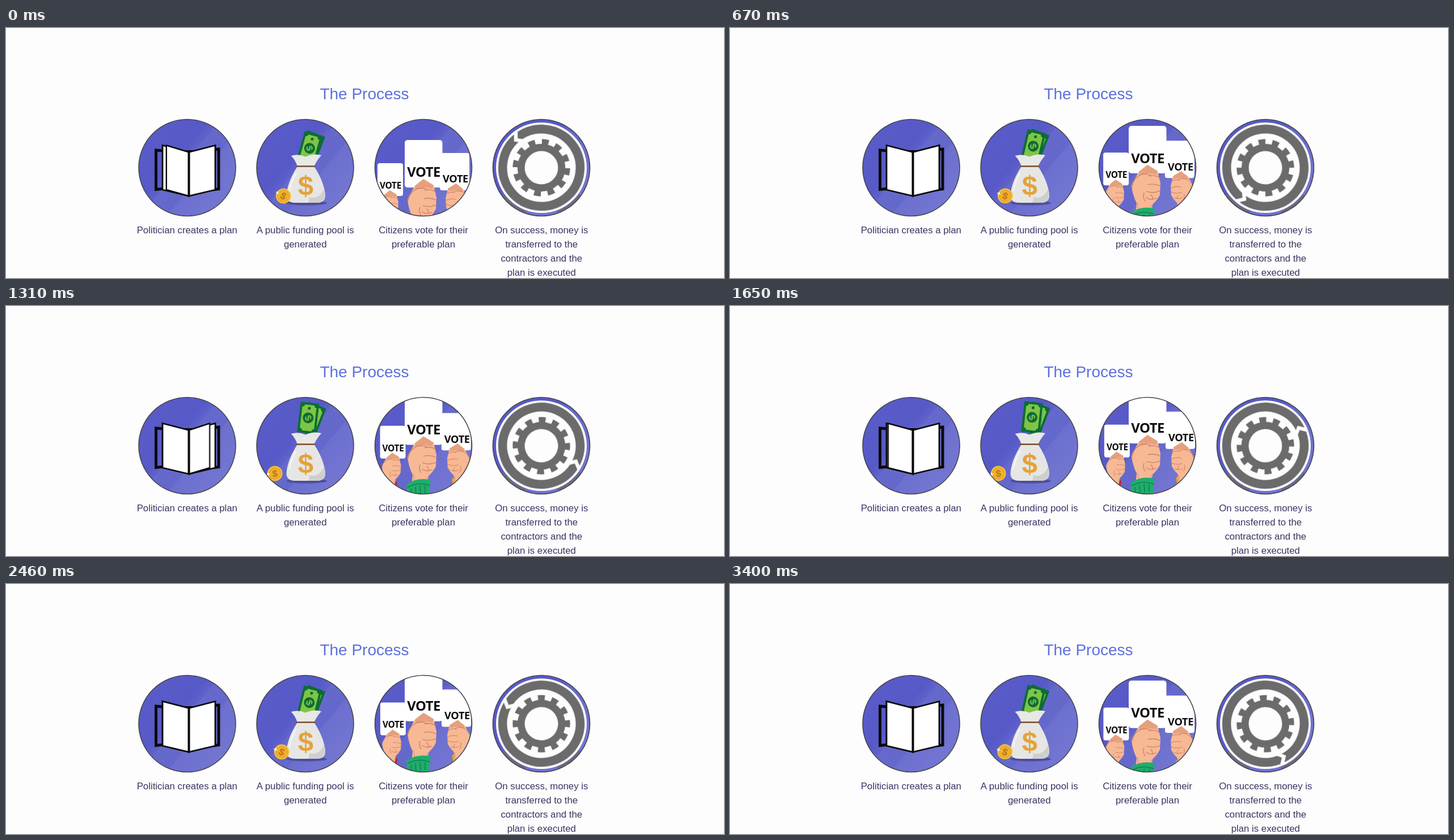
An HTML page for the animation above (3.42 s loop, 1266x442 px).

```html
<!DOCTYPE html>
<html lang="en">
<head>
<meta charset="utf-8">
<title>The Process</title>
<style>
  @property --drop { syntax: "<number>"; inherits: true; initial-value: 0; }
  @property --swing { syntax: "<number>"; inherits: true; initial-value: 0; }

  html, body { margin: 0; width: 100%; height: 100%; overflow: hidden; background: #fdfdfd; }

  #stage {
    display: block; width: 1266px; height: 442px;
    font-family: "Liberation Sans", Arial, sans-serif; text-anchor: middle;
    animation: drop 3420ms infinite, swing 3420ms infinite;
  }
  .title { font-size: 28px; fill: #5d70de; }
  .label { font-size: 16.8px; fill: #3b3361; }
  .rim { fill: none; stroke: #45454d; stroke-width: 1.6; }
  .vote { font-family: "Open Sans", "Noto Sans", sans-serif; font-weight: 700; letter-spacing: -.02em; fill: #0a0a0a; }
  .bold { font-weight: 700; }

  /* Signs and fists rise, settle, then start to sink */
  @keyframes drop {
    0% { --drop: 1; animation-timing-function: cubic-bezier(.33, .85, .67, 1); }
    60.82% { --drop: 0; animation-timing-function: cubic-bezier(.33, 0, .67, .15); }
    100% { --drop: .33; }
  }
  .sign-l { transform: translate(calc(var(--drop) * -5px), calc(var(--drop) * 30px)); }
  .sign-r { transform: translate(calc(var(--drop) * -3px), calc(var(--drop) * 35px)); }
  .sign-m { transform: translateY(calc(var(--drop) * 40px)); }

  /* Bills leave the bag while the coin rolls away */
  @keyframes swing {
    0% { --swing: .05; animation-timing-function: ease-out; }
    5.7% { --swing: 0; animation-timing-function: cubic-bezier(.37, 0, .63, 1); }
    45.18% { --swing: 1; animation-timing-function: cubic-bezier(.37, 0, .63, 1); }
    84.65% { --swing: 0; animation-timing-function: cubic-bezier(.33, 0, .67, .37); }
    100% { --swing: .33; }
  }
  .coin {
    transform: translate(calc(490px - var(--swing) * 17px), calc(297px - var(--swing) * 1px))
      rotate(calc(30deg - var(--swing) * 38deg));
  }
  .bill-back {
    transform: translate(calc(532px + var(--swing) * 2px), calc(181.5px - var(--swing) * 13px)) rotate(21deg);
  }
  .bill-front {
    transform: translate(calc(527px - var(--swing) * 8px), calc(183px - var(--swing) * 15px))
      rotate(calc(16deg - var(--swing) * 10deg));
  }

  .page { transform-origin: 322.5px 0; animation: flip 3420ms infinite cubic-bezier(.37, 0, .63, 1); }
  @keyframes flip {
    0% { transform: scaleX(-.85); animation-timing-function: ease-out; }
    2.63% { transform: scaleX(-1); animation-timing-function: step-end; }
    2.64%, 35.23% { transform: scaleX(1); }
    49.85% { transform: scaleX(-1); animation-timing-function: step-end; }
    49.86%, 54.53% { transform: scaleX(1); }
    69.15%, 100% { transform: scaleX(-1); }
  }

  .ring, .gear { transform-origin: 944px 247px; animation: 3420ms linear infinite; }
  .ring { animation-name: ring; }
  .gear { animation-name: gear; }
  @keyframes ring { from { transform: rotate(232deg); } to { transform: rotate(-298deg); } }
  @keyframes gear { from { transform: rotate(1deg); } to { transform: rotate(531deg); } }
</style>
</head>
<body>
<svg id="stage" viewBox="0 0 1266 442">
  <defs>
    <linearGradient id="sky" x1="0" y1=".08" x2="1" y2=".92">
      <stop offset="0" stop-color="#5a5cc9"/>
      <stop offset=".38" stop-color="#5659c7"/>
      <stop offset=".46" stop-color="#6063ca"/>
      <stop offset=".46" stop-color="#6669cc"/>
      <stop offset=".62" stop-color="#6568cb"/>
      <stop offset=".62" stop-color="#6c6fce"/>
      <stop offset="1" stop-color="#7679d2"/>
    </linearGradient>
    <clipPath id="clip2"><circle cx="527.5" cy="247" r="85.5"/></clipPath>
    <clipPath id="clip3"><circle cx="736" cy="247" r="85.5"/></clipPath>

    <path id="leaf" d="M322.5 219.5 L369 207.5 V286 L322.5 297 Z" fill="#fff" stroke="#0a0a0a" stroke-width="2.8"/>

    <g id="bill">
      <rect width="33" height="54" rx="1" fill="#0c6c37"/>
      <path d="M8 4 H25 Q25 8 29 8 V46 Q25 46 25 50 H8 Q8 46 4 46 V8 Q8 8 8 4 Z" fill="#7fc544"/>
      <circle cx="16.5" cy="10" r="2.6" fill="#0c6c37"/>
      <circle cx="16.5" cy="27" r="9.5" fill="#0c6c37"/>
      <text class="bold" font-size="16" fill="#7fc544" transform="translate(16.5 27) rotate(60)" y="5.6">$</text>
    </g>

    <!-- Fingertip at the origin -->
    <g id="fist">
      <path d="M-30 37 Q-29 31 -25 26 L-17 12 L-2 0 L16 11 Q17 16 21 32 L20 53 Q15 63 7 70 L4 88 H-23 L-21 68 Q-28 54 -30 37 Z" fill="#f7b894"/>
      <path d="M-17 12 L-2 0 L16 11 L14 17 L-1 15 L-16 19 Z" fill="#e6a07e"/>
      <path d="M-29 38 Q-27 24 -15 18 Q-4 14 4 19 M1 20 Q12 17 20 23 M-1 35 Q10 32 20 37 M-3 47 Q8 51 20 46 M-4 58 Q3 63 13 59 M-8 50 Q-11 58 -6 64 M4 53 Q8 56 7 61"
        fill="none" stroke="#c57758" stroke-width="1.1" stroke-linecap="round"/>
      <path d="M5 71 L2 86 M-20 66 Q-17 74 -19 84" fill="none" stroke="#e09c7a" stroke-width="1.5"/>
    </g>
    <path id="cuff" d="M-31 84 Q-12 72 10 77 Q12 82 9 88 L8 125 H-33 L-31 91 Q-33 88 -31 84 Z"/>
    <path id="ribs" d="M-30 90 Q-10 79 9 87 M-24 92 l1 14 M-16 89 l1 15 M-8 87 l1 15 M1 87 l0 14" fill="none" stroke="#0b7a48" stroke-width="1.3"/>
  </defs>

  <text class="title" x="632" y="126">The Process</text>

  <!-- Book -->
  <circle cx="319.5" cy="247" r="85.5" fill="url(#sky)"/>
  <g fill="none" stroke="#0a0a0a" stroke-width="5">
    <path d="M276 217 L264.5 216 V285.5 L278 284"/>
    <path d="M366 215 L375 214 V284.5 L364 286"/>
  </g>
  <path d="M312 217 L322.5 221 L333 217 Z" fill="#0a0a0a" stroke="#0a0a0a" stroke-width="2"/>
  <use href="#leaf" transform="translate(645 0) scale(-1 1)"/>
  <use href="#leaf"/>
  <g class="page"><use href="#leaf"/></g>
  <path d="M322.5 219 V297" stroke="#0a0a0a" stroke-width="4"/>
  <circle class="rim" cx="319.5" cy="247" r="85.5"/>

  <!-- Funding pool -->
  <circle cx="527.5" cy="247" r="85.5" fill="url(#sky)"/>
  <g clip-path="url(#clip2)">
    <ellipse cx="530" cy="309.5" rx="36" ry="4" fill="#4c4d9c"/>
    <g class="bill-back"><use href="#bill"/></g>
    <g class="bill-front"><use href="#bill"/></g>
    <path d="M502.5 226 Q515 222 528 227.5 Q543 221 556 225 Q548 234 543.5 244 H513.5 Q510 233 502.5 226 Z" fill="#e8e8e6"/>
    <path d="M513.5 245 Q495 275 494.5 297 Q495 309 510 309 H548 Q563 309 563 296 Q561 272 543.5 245 Z" fill="#e6e6e4"/>
    <path d="M563 292 Q563 309 548 309 H532 Q536 304 534 299 Q552 304 561 284 Z" fill="#cfcfce"/>
    <path d="M511 257 Q502 272 500 288" fill="none" stroke="#f5f5f4" stroke-width="2.5" stroke-linecap="round"/>
    <path d="M513 244.5 H544" stroke="#7a4a28" stroke-width="2.6" stroke-linecap="round"/>
    <text class="bold" x="528.5" y="295" font-size="49" fill="#e4a23b">$</text>
    <g class="coin">
      <circle r="13.3" fill="#f7c136"/>
      <circle r="10.3" fill="#f0b02c" stroke="#e09c22"/>
      <text class="bold" y="6" font-size="17" fill="#b5761b">$</text>
      <path d="M-12 -4 l1 3 3 1 -3 1 -1 3 -1 -3 -3 -1 3 -1 Z" fill="#fff"/>
    </g>
  </g>
  <circle class="rim" cx="527.5" cy="247" r="85.5"/>

  <!-- Vote -->
  <circle cx="736" cy="247" r="85.5" fill="url(#sky)"/>
  <g clip-path="url(#clip3)">
    <g class="sign-l">
      <rect x="660" y="209" width="45" height="58" rx="4" fill="#fff"/>
      <text class="vote" x="683" y="254" font-size="15.4">VOTE</text>
      <g transform="translate(683 257) scale(.66)">
        <use href="#cuff" fill="#c9222f"/><use href="#fist"/>
      </g>
    </g>
    <g class="sign-r">
      <rect x="768" y="186" width="52" height="66" rx="4" fill="#fff"/>
      <text class="vote" x="795.5" y="238.5" font-size="18.2">VOTE</text>
      <g transform="translate(795 240) scale(-.8 .8)">
        <use href="#cuff" fill="#e0a52c"/><use href="#fist"/>
      </g>
    </g>
    <g class="sign-m">
      <rect x="703" y="158" width="66.5" height="84" rx="5" fill="#fff"/>
      <text class="vote" x="736.5" y="223.5" font-size="23.8">VOTE</text>
      <g transform="translate(738 227)">
        <use href="#fist"/><use href="#cuff" fill="#1fad6c"/><use href="#ribs"/>
      </g>
    </g>
  </g>
  <circle class="rim" cx="736" cy="247" r="85.5"/>

  <!-- Execution -->
  <circle cx="944" cy="247" r="85.5" fill="url(#sky)"/>
  <circle cx="944" cy="247" r="80" fill="#fdfdfd"/>
  <path d="M876 295 A83 83 0 0 0 915.600 325 M972.400 325 A83 83 0 0 0 1012 295" fill="none" stroke="#6b6b73" stroke-width="4.500"/>
  <g class="ring">
    <circle cx="944" cy="247" r="68.3" fill="none" stroke="#6b6b6b" stroke-width="15.6"/>
    <path d="M1022 251 L1010.5 242 L1001 251" fill="none" stroke="#fdfdfd" stroke-width="6.5"/>
  </g>
  <g class="gear" fill="none" stroke="#6b6b6b">
    <circle cx="944" cy="247" r="35.8" stroke-width="12.8"/>
    <circle cx="944" cy="247" r="46" stroke-width="9.4" pathLength="24" stroke-dasharray="1 1"/>
  </g>
  <circle class="rim" cx="944" cy="247" r="85.5"/>

  <g class="label">
    <text x="319.3" y="363">Politician creates a plan</text>
    <text x="527.7" y="363">A public funding pool is</text>
    <text x="527.7" y="388">generated</text>
    <text x="736" y="363">Citizens vote for their</text>
    <text x="736" y="388">preferable plan</text>
    <text x="944.3" y="363">On success, money is</text>
    <text x="944.3" y="388">transferred to the</text>
    <text x="944.3" y="413">contractors and the</text>
    <text x="944.3" y="438">plan is executed</text>
  </g>
</svg>
</body>
</html>
```
